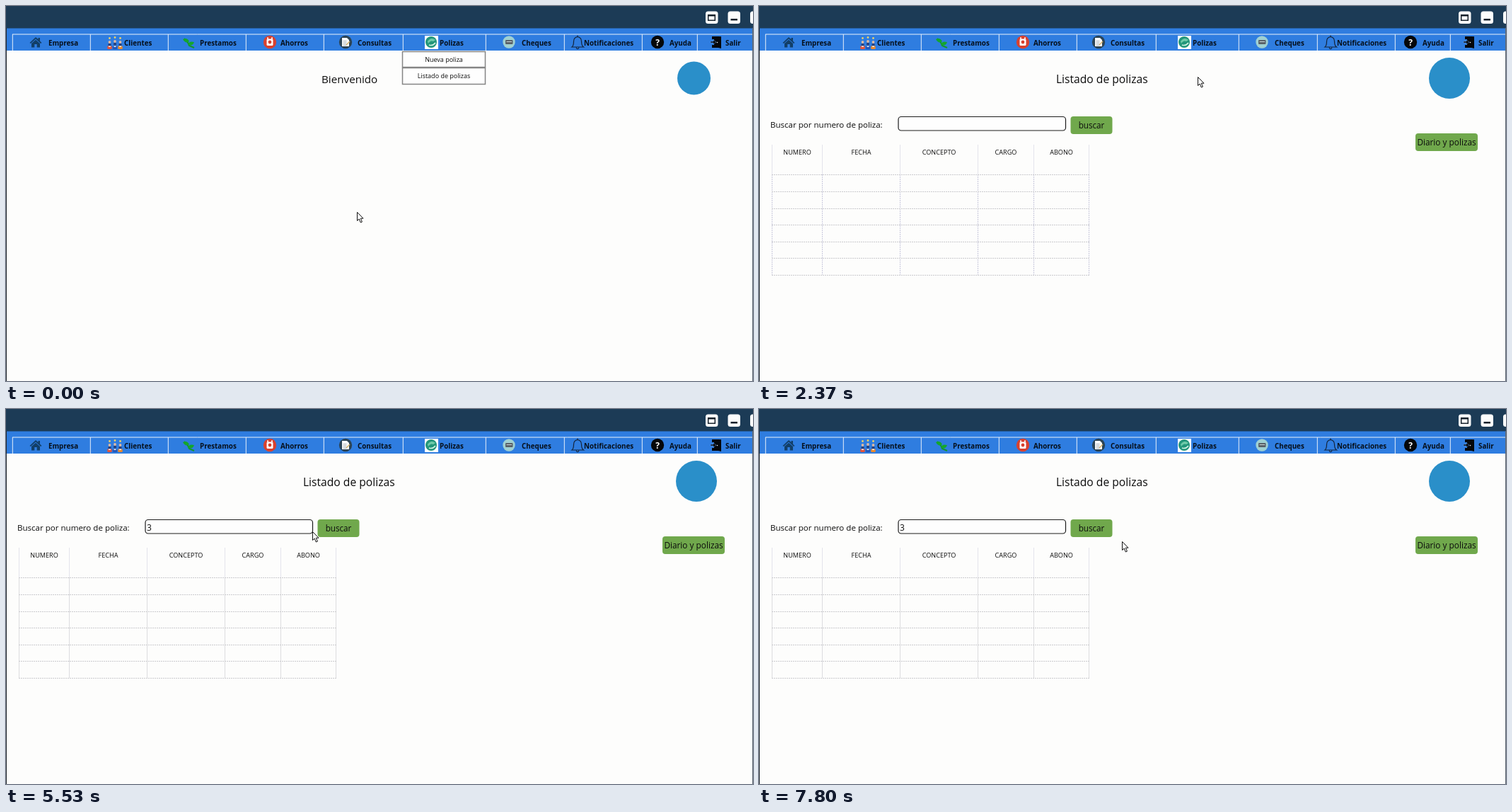
These frames come from a looping animation (1056x530 px, 8000 ms). An HTML page with a canvas:

```html
<!DOCTYPE html>
<html lang="es">
<head>
<meta charset="utf-8">
<title>Listado de polizas</title>
<style>
  html, body { margin: 0; width: 100%; height: 100%; overflow: hidden; background: #fdfdfc; }
  canvas { display: block; }
</style>
</head>
<body>
<canvas id="stage" width="1056" height="530"></canvas>
<script>
const ctx = document.getElementById('stage').getContext('2d');
const LOOP = 8000;
const FONT = '"Open Sans", "Noto Sans", sans-serif';
const BLUE = '#2f7de0', NAVY = '#1c3b56', PAPER = '#fdfdfc', GREEN = '#70a84c', MARK = '#2a8fc9';

// Moments at which the screen changes
const MENU_CLOSE = 2170, LIST_OPEN = 2370, GRID_SETTLE = 2600, TYPED = 4900;

// Pointer path: time, x, y
const PATH = [
  [0, 497, 291], [600, 497, 291], [1370, 621, 100], [2870, 621, 100],
  [3300, 292, 191], [3400, 292, 191], [3600, 250, 164], [3700, 250, 164],
  [4030, 242, 167], [5300, 242, 167], [5530, 434, 173], [5630, 434, 173],
  [6000, 441, 163], [6129, 441, 163], [6130, 447, 165], [6270, 447, 165],
  [6470, 455, 168], [6630, 455, 168], [6800, 514, 187], [LOOP, 514, 187]
];

function rect(x, y, w, h, fill) {
  ctx.fillStyle = fill;
  ctx.fillRect(x, y, w, h);
}

function round(x, y, w, h, r, fill, stroke, width = 1) {
  ctx.beginPath();
  ctx.roundRect(x, y, w, h, r);
  if (fill) { ctx.fillStyle = fill; ctx.fill(); }
  if (stroke) { ctx.strokeStyle = stroke; ctx.lineWidth = width; ctx.stroke(); }
}

function disc(x, y, r, fill) {
  ctx.fillStyle = fill;
  ctx.beginPath();
  ctx.arc(x, y, r, 0, Math.PI * 2);
  ctx.fill();
}

function shape(d, fill, stroke, width = 1, x = 0, y = 0) {
  const p = new Path2D(d);
  ctx.save();
  ctx.translate(x, y);
  if (fill) { ctx.fillStyle = fill; ctx.fill(p); }
  if (stroke) { ctx.strokeStyle = stroke; ctx.lineWidth = width; ctx.stroke(p); }
  ctx.restore();
}

function line(x1, y1, x2, y2, color, dash = []) {
  ctx.setLineDash(dash);
  ctx.strokeStyle = color;
  ctx.lineWidth = 1;
  ctx.beginPath();
  ctx.moveTo(x1, y1);
  ctx.lineTo(x2, y2);
  ctx.stroke();
  ctx.setLineDash([]);
}

function text(str, x, y, size, { align = 'left', weight = 400, color = '#0c0c0c' } = {}) {
  ctx.font = `${weight} ${size}px ${FONT}`;
  ctx.textAlign = align;
  ctx.fillStyle = color;
  ctx.fillText(str, x, y);
}

const icons = {
  house() {
    shape('M33.5 52 L42 44 L45.5 47 V45 H48 V49.5 L50.5 52 L49 53 L42 46.5 L35 53 Z', '#123f68');
    shape('M36 53 L42 47.7 L48 53 V58.5 H43.7 V54 H40.3 V58.5 H36 Z', '#123f68');
  },
  people() {
    ['#e0533c', '#2456b8', '#e8882e'].forEach((color, i) => {
      const x = 146.5 + i * 7.5, y = i === 1 ? -1 : 0;
      disc(x, 45.5 + y, 1.4, '#e9cf6a');
      disc(x, 51 + y, 1.9, '#d9b7a4');
      round(x - 2, 53 + y, 4, 3.5, 1.2, '#27407c');
      round(x - 3.2, 56.5, 6.4, 4.5, 1, color);
      rect(x - 1.5, 56.5, 3, 1.5, '#f4efe8');
    });
  },
  plant() {
    shape('M252 46 Q257 50 259 56 L266 59', null, '#12982a', 2);
    shape('M250 47 Q256 44 259 50 Q254 54 250 47 Z', '#14a62c');
    shape('M257 55 Q258 49 266 51 Q264 57 257 55 Z', '#14a62c');
  },
  savings() {
    disc(373, 51, 9.2, '#d8412f');
    round(368.5, 46.5, 9, 9.5, 1.5, '#fff');
    disc(373, 51, 2.4, '#d8412f');
    rect(369, 44.5, 2, 2, '#fff');
    rect(375, 44.5, 2, 2, '#fff');
  },
  query() {
    disc(480, 51, 9.2, '#2b4456');
    shape('M475 45 H482 L485 48 V57 H475 Z', '#fafafa');
    for (let y = 49; y < 56; y += 2) line(476.5, y + .5, 481.5, y + .5, '#b4bcc2');
    shape('M481 55 L486 50', null, '#d8b46c', 1.5);
  },
  policy() {
    rect(592, 42, 19, 19, '#fff');
    disc(601, 51, 8, '#23967a');
    shape('M596 50 Q601 43 607 48 L604 50 Q600 48 597 53 Z', '#6fcaa9');
    shape('M598 55 Q603 57 607 52', null, '#d4f2e5', 1.5);
  },
  cheque() {
    disc(711, 51, 8.7, '#9fd0d2');
    round(706, 48, 10.5, 6, 1, '#5a6268');
    line(707.5, 50.5, 715, 50.5, '#c8d4d4');
  },
  bell() {
    shape('M800 58 Q802.5 56 802.5 50 Q802.5 44.5 808 43.5 Q813.5 44.5 813.5 50 Q813.5 56 816.5 58 Z',
      null, '#14243a', 1.2);
    shape('M806 58.5 Q808 63 810 58.5 M808 43.5 V41.5', null, '#14243a', 1.2);
  },
  help() {
    disc(921, 51, 9.2, '#05070a');
    text('?', 921, 55.5, 12, { align: 'center', weight: 700, color: '#fff' });
  },
  exit() {
    shape('M998 43 H1009 V46 H1005 V57 H1009 V59 H998 V55 H1001 V47 H998 Z', '#05070a');
    shape('M1003 44 L1011 43 V60 L1003 58 Z', '#05070a');
    shape('M996 50 H1000 V48 L1004 51 L1000 54 V52 H996 Z', '#05070a', '#6aa0e6', .5);
    disc(1005.5, 51.5, .8, '#fff');
  }
};

// Left edge, label, label x, icon
const MENU = [
  [9, 'Empresa', 60, 'house'], [119, 'Clientes', 167, 'people'],
  [229, 'Prestamos', 274, 'plant'], [339, 'Ahorros', 388, 'savings'],
  [449, 'Consultas', 497, 'query'], [561, 'Polizas', 613, 'policy'],
  [678, 'Cheques', 729, 'cheque'], [789, 'Notificaciones', 817, 'bell'],
  [899, 'Ayuda', 938, 'help'], [977, 'Salir', 1017, 'exit']
];

function drawFrame() {
  rect(0, 0, 1056, 530, PAPER);
  rect(0, 0, 1056, 32, NAVY);
  rect(1, 31.5, 1054, 31.5, BLUE);
  rect(0, 31, 1, 499, '#20262c');
  rect(1055, 31, 1, 499, '#5c6670');

  round(989, 7.5, 17.5, 17.5, 3.5, '#fdfdfd');
  ctx.strokeStyle = '#15202b';
  ctx.lineWidth = 1.5;
  ctx.strokeRect(992.7, 12.7, 9.6, 7.6);
  rect(992, 12, 11, 2.5, '#15202b');
  round(1020.5, 7.5, 17.5, 17.5, 3.5, '#fdfdfd');
  rect(1024.5, 18, 9.5, 2.5, '#15202b');
  round(1052, 7.5, 17.5, 17.5, 3.5, '#fdfdfd');

  line(9, 40, 1055, 40, '#e9f1fb');
  for (const [edge, label, x, icon] of MENU) {
    line(edge + .3, 40, edge + .3, 63, '#e9f1fb');
    icons[icon]();
    text(label, x, 56, 9.8, { weight: 700, color: '#06101c' });
  }
}

function drawWelcome(menuOpen) {
  text('Bienvenido', 446, 109, 15.2);
  disc(972.5, 102, 23.5, MARK);
  if (!menuOpen) return;
  ['Nueva poliza', 'Listado de polizas'].forEach((label, i) => {
    const y = 64.5 + i * 23;
    round(560.5, y, 117, i ? 23 : 22, 0, '#fefefe', '#858585', 1.5);
    text(label, 619, y + 14.5, 9, { align: 'center' });
  });
}

function drawButton(label, x, y, w, size) {
  round(x, y, w, 25, 4, GREEN);
  text(label, x + w / 2, y + 17, size, { align: 'center' });
}

function drawGrid(settled) {
  const cols = [18.5, 89.5, 199.5, 309.5, 388.5, 466.5];
  const heads = ['NUMERO', 'FECHA', 'CONCEPTO', 'CARGO', 'ABONO'];
  for (const x of cols) {
    line(x, 196, x, 238, '#e4e4ec');
    if (settled) line(x, 238, x, 380, '#dcdcdf');
    else line(x, 238, x, 380, '#c8c8dc', [2, 1]);
  }
  for (let i = 0; i < 7; i++) {
    const y = Math.round(238.2 + i * 23.65) + .5;
    line(18, y, 467, y, '#cacace', [2, 1]);
  }
  heads.forEach((h, i) =>
    text(h, (cols[i] + cols[i + 1]) / 2, 210, 9.1, { align: 'center' }));
}

function drawList(t) {
  text('Listado de polizas', 420, 109, 15.65);
  disc(976, 102, 29, MARK);
  text('Buscar por numero de poliza:', 16, 171.5, 11.55);
  round(197, 156.5, 236.5, 19.5, 4, '#fefefe', '#1c1c1c', 1.2);
  drawButton('buscar', 440.5, 156, 59, 11.7);
  drawButton('Diario y polizas', 928, 180, 88, 11.8);
  drawGrid(t >= GRID_SETTLE);

  if (t >= TYPED) text('3', 199, 171.5, 12);
  if (t >= 4270 && t < 4670) rect(198.5, 158, 1, 16, '#111');
  if (t >= TYPED && t < 5300) rect(206.5, 158, 1, 16, '#111');
}

function pointerAt(t) {
  const i = PATH.findIndex(p => p[0] > t);
  const [t0, x0, y0] = PATH[i - 1], [t1, x1, y1] = PATH[i];
  const u = (t - t0) / (t1 - t0), e = u * u * (3 - 2 * u);
  return [Math.round(x0 + (x1 - x0) * e), Math.round(y0 + (y1 - y0) * e)];
}

function drawPointer(t) {
  const [x, y] = pointerAt(t);
  const inField = t > LIST_OPEN && x > 198 && x < 432 && y > 157 && y < 175;
  if (inField) {
    shape('M-3 -7.5 H-1 M1 -7.5 H3 M-3 7.5 H-1 M1 7.5 H3 M.5 -7 V7', null, '#111', 1, x, y);
  } else {
    shape('M.5 .5 V12.5 L3.2 10 L5.3 15 L7.4 14.1 L5.3 9.2 H9 Z', '#fff', '#111', 1, x - 1, y);
  }
}

function render(now) {
  const t = now % LOOP;
  drawFrame();
  if (t < LIST_OPEN) drawWelcome(t < MENU_CLOSE);
  else drawList(t);
  drawPointer(t);
}

const start = performance.now();
function tick() {
  render(performance.now() - start);
  requestAnimationFrame(tick);
}
tick();
</script>
</body>
</html>
```
